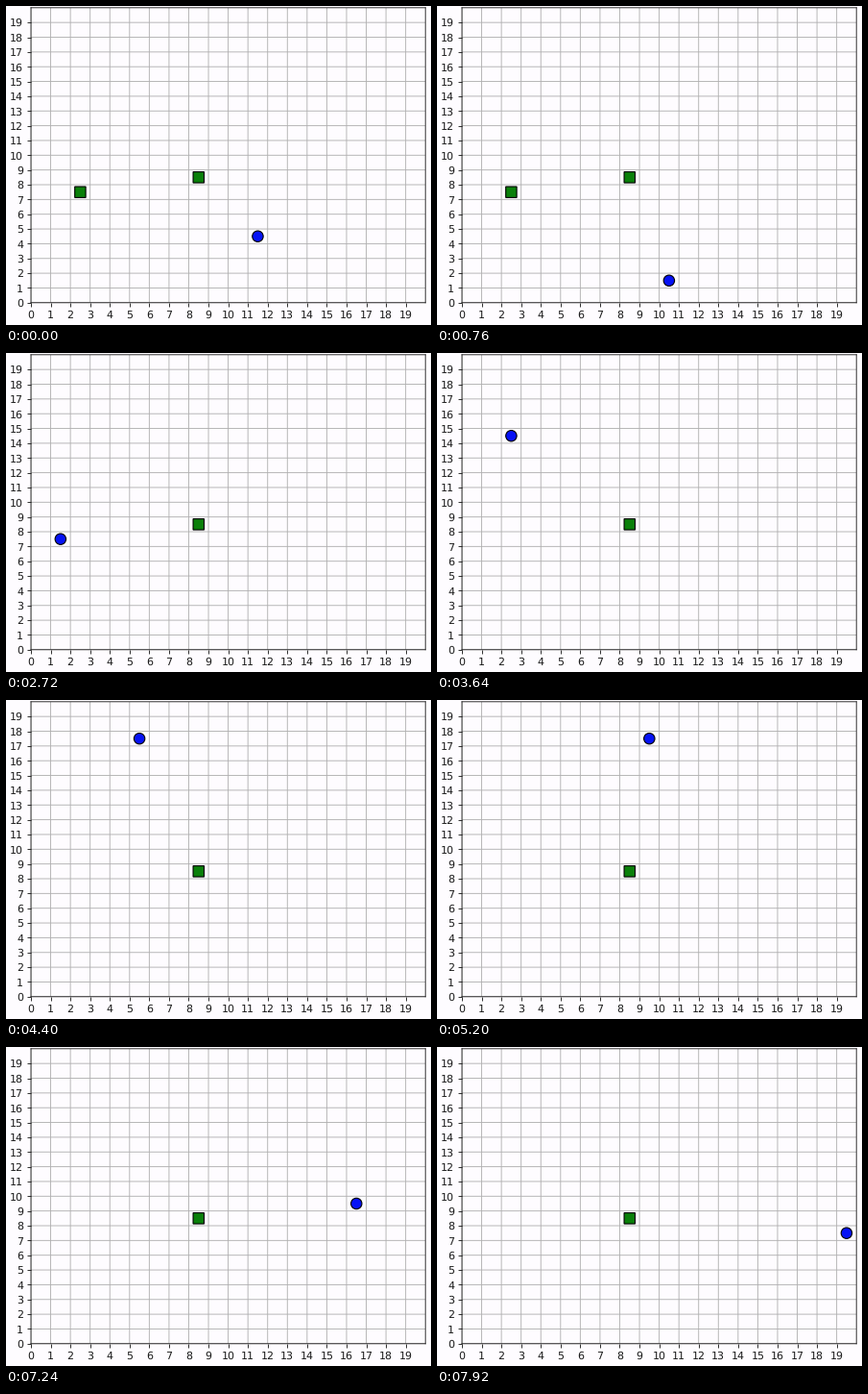
Write a matplotlib script that moves like this. It is 443 px wide and 332 px high and loops after 8000 ms.

```python
import random
from itertools import product

import matplotlib.pyplot as plt
from matplotlib.animation import FuncAnimation
from matplotlib.patches import Ellipse, Rectangle

WIDTH, HEIGHT, DPI = 443, 332, 80
FRAMES, INTERVAL = 200, 40
SIZE = 20
LEFT, RIGHT, TOP, BOTTOM = 26, 437.2, 1.8, 308.8
PAPER, INK, GRID, BLUE, GREEN = "#fefcff", "#1c1c1c", "#b0b0b0", "#0612f5", "#0a800a"
MARK_W = 11.4 * SIZE / (RIGHT - LEFT)
MARK_H = 11.4 * SIZE / (BOTTOM - TOP)
FOOD = [(2, 7), (8, 8)]
REST_CHANCE = 0.22

# Turning points of the walk: frame and cell
TURNS = {
    0: (11, 4), 7: (13, 3), 19: (10, 1), 46: (2, 1), 62: (1, 6), 67: (2, 7),
    74: (0, 9), 91: (2, 14), 109: (4, 18), 119: (6, 16), 130: (9, 17),
    140: (8, 15), 152: (13, 11), 163: (13, 12), 167: (13, 12),
    188: (18, 9), 198: (19, 7), FRAMES - 1: (19, 7),
}


def gap(a, b):
    """Number of king's moves between two cells."""
    return max(abs(a[0] - b[0]), abs(a[1] - b[1]))


def step(cell, start, goal, left, progress, rng):
    """Take a random step, or rest, near the straight line to the goal."""
    ideal = [a + (b - a) * progress for a, b in zip(start, goal)]
    resting = rng.random() < REST_CHANCE

    def cost(option):
        off_line = sum(abs(a - b) for a, b in zip(option, ideal))
        unwanted = (option == cell) != resting
        return off_line + 1.5 * rng.random() + 3 * unwanted

    box = product(*(range(min(a, b), max(a, b) + 1) for a, b in zip(start, goal)))
    return min((option for option in box
                if gap(option, cell) <= 1 and gap(option, goal) <= left), key=cost)


def walk():
    rng = random.Random(4)
    turns = list(TURNS.items())
    path = [turns[0][1]]
    for (first, start), (last, goal) in zip(turns, turns[1:]):
        for frame in range(first + 1, last + 1):
            progress = (frame - first) / (last - first)
            path.append(step(path[-1], start, goal, last - frame, progress, rng))
    return path


def center(cell):
    return cell[0] + 0.5, cell[1] + 0.5


def make_square(cell):
    x, y = center(cell)
    return Rectangle((x - MARK_W / 2, y - MARK_H / 2), MARK_W, MARK_H,
                     fc=GREEN, ec="black", lw=1, zorder=3, snap=False)


plt.rcParams.update({"font.family": "DejaVu Sans", "text.hinting": "none",
                     "text.hinting_factor": 1})
fig = plt.figure(figsize=(WIDTH / DPI, HEIGHT / DPI), dpi=DPI, facecolor=PAPER)
ax = fig.add_axes([LEFT / WIDTH, 1 - BOTTOM / HEIGHT,
                   (RIGHT - LEFT) / WIDTH, (BOTTOM - TOP) / HEIGHT], facecolor=PAPER)
ax.set(xlim=(0, SIZE), ylim=(0, SIZE), xticks=range(SIZE), yticks=range(SIZE))
ax.tick_params(labelsize=10.2, labelcolor=INK, color=INK)
ax.grid(True, color=GRID, linewidth=0.8)
ax.set_axisbelow(True)
for line in [*ax.get_xgridlines(), *ax.get_ygridlines(), *ax.spines.values()]:
    line.set_snap(False)
for spine in ax.spines.values():
    spine.set_edgecolor(INK)

path = walk()
squares = [ax.add_patch(make_square(cell)) for cell in FOOD]
ball = ax.add_patch(Ellipse(center(path[0]), MARK_W, MARK_H, fc=BLUE,
                            ec="black", lw=1, zorder=4))


def update(frame):
    ball.set_center(center(path[frame]))
    for cell, square in zip(FOOD, squares):
        square.set_visible(cell not in path[:frame + 1])
    return [ball, *squares]


anim = FuncAnimation(fig, update, frames=FRAMES, interval=INTERVAL,
                     repeat=True, repeat_delay=0)
plt.show()
```
